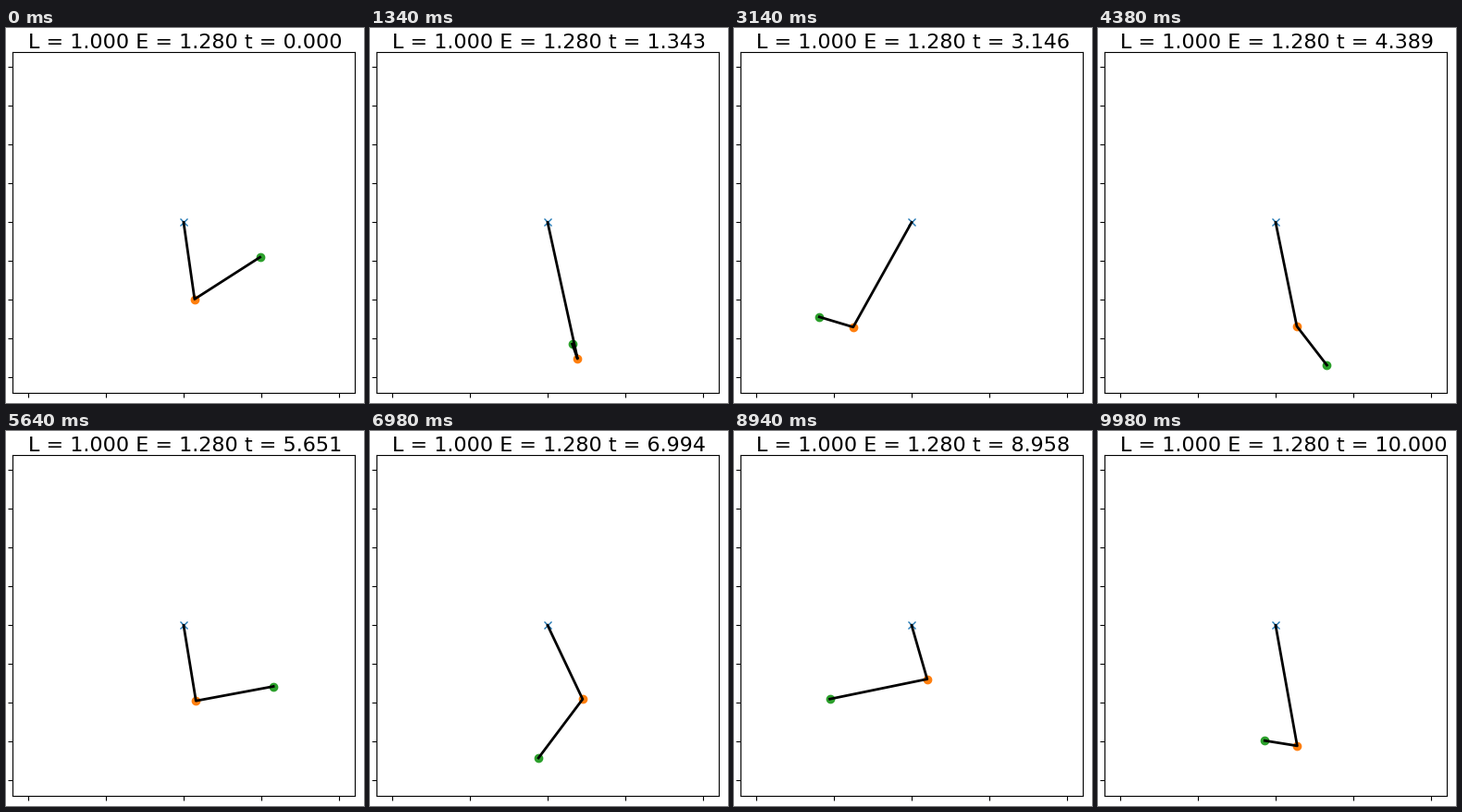
Recreate the animation shown at these times as a matplotlib script. Size 387 px wide and 406 px high, loop 10000 ms.

```python
import numpy as np
import matplotlib.pyplot as plt
from matplotlib.animation import FuncAnimation

W, H, DPI = 387, 406, 100
FRAMES, INTERVAL = 500, 20
T_END, SUBSTEPS = 10.0, 60
G = 1.0


def dot(a, b):
    return (a.conjugate() * b).real


def cross(a, b):
    return (a.conjugate() * b).imag


def derivative(state):
    """Bead sliding on a string with an equal mass at its end (points are x + iy)."""
    p1, p2, v1, v2 = state
    rel, vrel = p2 - p1, v2 - v1
    r1, r2 = abs(p1), abs(rel)
    u1, u2 = p1 / r1, rel / r2
    pull = -G * u1.imag + cross(u1, v1) ** 2 / r1 + cross(u2, vrel) ** 2 / r2
    tension = pull / (3 - 2 * dot(u1, u2))
    return v1, v2, tension * (u2 - u1) - G * 1j, -tension * u2 - G * 1j


def shift(state, slope, h):
    return tuple(s + h * d for s, d in zip(state, slope))


def rk4(state, h):
    k1 = derivative(state)
    k2 = derivative(shift(state, k1, h / 2))
    k3 = derivative(shift(state, k2, h / 2))
    k4 = derivative(shift(state, k3, h))
    mean = [(a + 2 * b + 2 * c + d) / 6 for a, b, c, d in zip(k1, k2, k3, k4)]
    return shift(state, mean, h)


def direction(theta):
    """Unit vector at an angle measured from straight up."""
    return complex(np.sin(theta), np.cos(theta))


def solve():
    start = 0.5 * direction(3)
    state = (start, start + 0.5 * direction(1), 0j, 0j)
    h = T_END / (FRAMES - 1) / SUBSTEPS
    states = [state]
    for _ in range(FRAMES - 1):
        for _ in range(SUBSTEPS):
            state = rk4(state, h)
        states.append(state)
    return states


times = np.linspace(0, T_END, FRAMES)
states = solve()

# the small surplus guards against the pixel size being truncated
fig = plt.figure(figsize=((W + 1e-6) / DPI, (H + 1e-6) / DPI), dpi=DPI,
                 facecolor="white")
left, bottom, side = 7.2, H - 395.2, 369.6
ax = fig.add_axes([left / W, bottom / H, side / W, side / H])
ax.set(xlim=(-1.1, 1.1), ylim=(-1.1, 1.1),
       xticks=np.arange(-1, 1.1, 0.5), yticks=np.arange(-1, 1.1, 0.25))
ax.tick_params(labelbottom=False, labelleft=False)

ax.plot([0], [0], "x", color="C0")
bead, = ax.plot([], [], "o", color="C1")
tip, = ax.plot([], [], "o", color="C2")
string, = ax.plot([], [], "k-", lw=2)
label = ax.text(-1, 1.12, "", fontsize=16, family="DejaVu Sans")


def update(i):
    p1, p2, v1, v2 = states[i]
    length = abs(p1) + abs(p2 - p1)
    energy = (abs(v1) ** 2 + abs(v2) ** 2) / 2 + G * (p1.imag + p2.imag + 2)
    bead.set_data([p1.real], [p1.imag])
    tip.set_data([p2.real], [p2.imag])
    string.set_data([0, p1.real, p2.real], [0, p1.imag, p2.imag])
    label.set_text(f"L = {length:.3f} E = {energy:.3f} t = {times[i]:.3f}")
    return bead, tip, string, label


anim = FuncAnimation(fig, update, frames=FRAMES, interval=INTERVAL,
                     repeat=True, repeat_delay=0)
plt.show()
```
